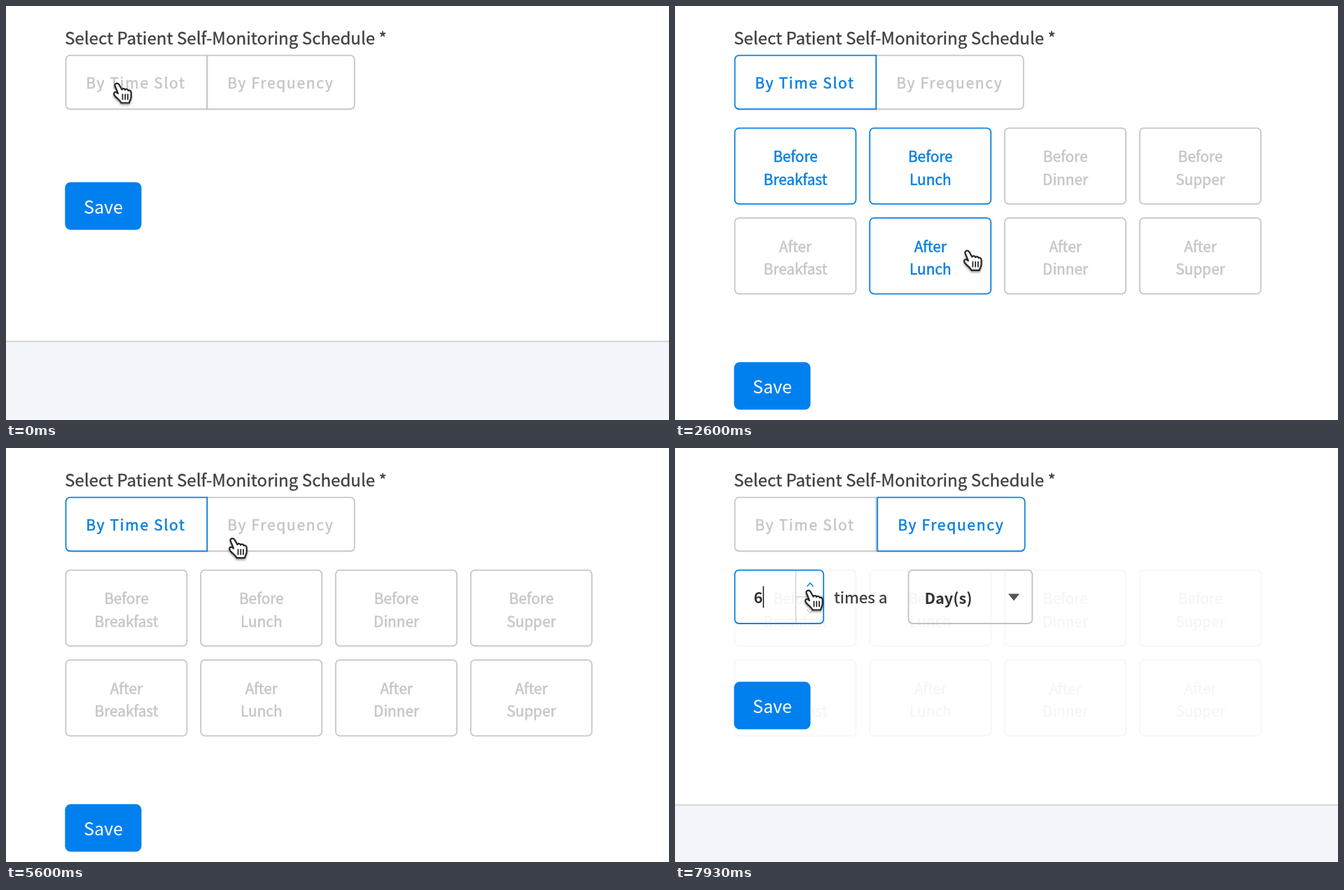
An HTML page for the animation above (8000 ms loop, 947 by 592 pixels).

```html
<!DOCTYPE html>
<html lang="en">
<head>
<meta charset="utf-8">
<title>Schedule picker</title>
<style>
html, body { margin: 0; width: 100%; height: 100%; overflow: hidden; background: #fff; }
svg { display: block; width: 947px; height: 592px; --blue: #0a80e2; }
text { font-family: "Noto Sans CJK JP", "Noto Sans CJK SC", "Noto Sans CJK", "Noto Sans", sans-serif; font-weight: 400; }
.title { font-size: 24.1px; fill: #404040; stroke: #404040; stroke-width: .35px; }
.tab, .tile { color: #c6c6c6; }
.tab.on, .tile.on { color: var(--blue); }
.tab text, .tile text { fill: currentColor; stroke: currentColor; stroke-width: .55px; }
.tab text { font-size: 21px; letter-spacing: 1.7px; }
.tile text { font-size: 20.8px; text-anchor: middle; }
.tab path, .tile rect { fill: none; stroke: currentColor; stroke-width: 1.8px; }
.save text { font-size: 25.2px; fill: #fff; text-anchor: middle; }
.field { fill: none; stroke: #c2c2c2; stroke-width: 1.8px; }
.thin { fill: none; stroke: #d2d2d2; stroke-width: 1.4px; }
.chevron { fill: none; stroke: #999; stroke-width: 1.5px; }
.bold { font-size: 21.7px; font-weight: 700; fill: #333; }
.unit { font-size: 22.5px; fill: #383838; stroke: #383838; stroke-width: .3px; }
.focus #box, .focus #up { stroke: var(--blue); }
.focus #up { transform: translateY(2px); }
#caret { stroke: #222; stroke-width: 1.6px; visibility: hidden; }
.focus #caret { visibility: visible; }
#cursor { filter: drop-shadow(0 2px 1.5px rgba(0,0,0,.4)); }
</style>
</head>
<body>
<svg viewBox="0 0 947 592">
  <g id="footer">
    <rect width="947" height="600" fill="#f2f6fb"/>
    <rect width="947" height="2" fill="#d3d5d8"/>
  </g>
  <text class="title" x="84" y="55">Select Patient Self-Monitoring Schedule *</text>
  <g id="tabs">
    <g class="tab" id="slot">
      <path d="M287.3 70.7H91.5a6 6 0 0 0-6 6V141.5a6 6 0 0 0 6 6H287.3Z"/>
      <text x="114.3" y="118">By Time Slot</text>
    </g>
    <g class="tab" id="freq">
      <path d="M287.3 70.7H491.8a6 6 0 0 1 6 6V141.5a6 6 0 0 1-6 6H287.3Z"/>
      <text x="316.3" y="118">By Frequency</text>
    </g>
  </g>
  <g id="tiles"></g>
  <g id="form">
    <path class="thin" d="M172.5 175V251M173 213H212"/>
    <rect class="field" id="box" x="85.4" y="174.6" width="126.8" height="76.4" rx="6"/>
    <path class="chevron" id="up" d="M188.5 196l4.5-5 4.5 5"/>
    <path class="chevron" opacity=".5" d="M188.5 231l4.5 5 4.5-5"/>
    <text class="bold" id="count" x="119" y="221.5" text-anchor="middle">1</text>
    <path id="caret" d="M126.3 197.5V228.5"/>
    <text class="unit" x="227.3" y="221.5">times a</text>
    <rect class="field" x="333.5" y="174.6" width="176.8" height="76.4" rx="6"/>
    <text class="bold" x="356.5" y="223">Day(s)</text>
    <path d="M476 208.5h16l-8 10z" fill="#555"/>
  </g>
  <g id="save" class="save">
    <rect x="84.3" width="109.2" height="68" rx="8" fill="#0080ee"/>
    <text x="139" y="44.5">Save</text>
  </g>
  <g id="cursor">
    <g id="hand" stroke="#262626" stroke-linejoin="round" stroke-linecap="round">
      <path stroke-width="2.2" fill="#fff" d="M-3 4C-5 0 0-2 2.500 1.500L6.500 8.500C7.500 6.500 10.500 6.500 11 9C12 7.500 15 7.500 15.800 10C17.500 9 19.500 10 19.700 13V19C19.700 22.500 17.500 24 17 27.500H5.500C5 25 0 21.500-3 18C-6.500 14.500-4.500 11-1 12.500L1 14Z"/>
      <path stroke-width="1.8" d="M7.500 15.500v7M11.300 15.500v7M15 15.500v7"/>
    </g>
    <path id="arrow" d="M0 0V23.500L5.300 18.700L9.200 27.500L13.200 25.700L9.500 17.200H16.500Z" fill="#141414" stroke="#fff" stroke-width="1.5"/>
  </g>
</svg>
<script>
const $ = id => document.getElementById(id);
const LOOP = 8000, FPS = 15, FADE = 600, GLIDE = 330, LAG = 70;
const GRID = { x: 85.4, y: 174.6, dx: 192.8, dy: 128.5, w: 173, h: 108.6 };

// pointer stops: arrival, x, y, travel time if slower than GLIDE
const START = [159, 111];
const stops = [
  [330, 195, 113], [1470, 134, 214], [1930, 338, 214], [2400, 362, 348],
  [2870, 531, 355], [3470, 548, 354], [4000, 351, 356], [4500, 368, 190],
  [5070, 198, 215], [5870, 356, 108, 600], [6930, 197, 204, 660], [7130, 191, 204]
];
// what a click does follows from where the pointer is
const clicks = [800, 1670, 2070, 2600, 3070, 3730, 4200, 4800, 5330, 6130, 7200, 7470, 7670, 7800, 7930];

const meals = ["Breakfast", "Lunch", "Dinner", "Supper"];
$("tiles").innerHTML = ["Before", "After"].map((when, row) => meals.map((meal, col) =>
  `<g class="tile" transform="translate(${GRID.x + col * GRID.dx} ${GRID.y + row * GRID.dy})">
    <rect width="${GRID.w}" height="${GRID.h}" rx="6"/>
    <text x="86.600" y="48.700">${when}</text><text x="86.600" y="81">${meal}</text>
  </g>`).join("")).join("");
const tiles = [...$("tiles").children];

const ramp = (t, start, length) => Math.min(1, Math.max(0, (t - start) / length));
const show = (el, on) => el.style.display = on ? "" : "none";
const put = (el, x, y) => el.setAttribute("transform", `translate(${x} ${y})`);

function pointer(t) {
  let [x, y] = START;
  for (const [end, toX, toY, length = GLIDE] of stops) {
    const k = 1 - (1 - ramp(t, end - length, length)) ** 2;
    x += (toX - x) * k;
    y += (toY - y) * k;
  }
  return [x, y];
}

// tab name, tile index, "up" for the spinner, or null
function hit([x, y], tab) {
  if (y > 70 && y < 148 && x > 85 && x < 498) return x < 288 ? "slot" : "freq";
  if (tab === "slot") {
    const col = (x - GRID.x) / GRID.dx, row = (y - GRID.y) / GRID.dy;
    const inside = col >= 0 && col < 4 && row >= 0 && row < 2
      && col % 1 * GRID.dx < GRID.w && row % 1 * GRID.dy < GRID.h;
    return inside ? Math.floor(row) * 4 + Math.floor(col) : null;
  }
  return tab === "freq" && x > 172 && x < 213 && y > 174 && y < 252 ? "up" : null;
}

function stateAt(t) {
  const state = { tab: null, since: 0, on: new Set(), count: 1 };
  for (const time of clicks) {
    if (time > t) break;
    const target = hit(pointer(time), state.tab);
    if (target === "up") state.count++;
    else if (typeof target === "string") Object.assign(state, { tab: target, since: time });
    else if (target !== null && !state.on.delete(target)) state.on.add(target);
  }
  return state;
}

const layout = {
  null: { save: 252, footer: 478.7 },
  slot: { save: 509.3, footer: 700 },
  freq: { save: 334.3, footer: 509.5 }
};

let shownTab;
function setTab(tab) {
  if (tab === shownTab) return;
  shownTab = tab;
  for (const id of ["slot", "freq"]) $(id).classList.toggle("on", id === tab);
  if (tab) $("tabs").append($(tab));
  put($("freq"), tab === "freq" ? 1.9 : 0, 0);
  put($("save"), 0, layout[tab].save);
  put($("footer"), 0, layout[tab].footer);
}

function draw(t) {
  const { tab, since, on, count } = stateAt(t);
  const fade = ramp(t, since - 60, FADE);
  setTab(tab);

  // the tiles leave a faint trace behind the form
  $("tiles").style.opacity = tab === "slot" ? fade : tab ? 1 - .84 * fade : 0;
  tiles.forEach((tile, i) => tile.classList.toggle("on", on.has(i)));

  $("form").style.opacity = tab === "freq" ? fade : 0;
  $("form").classList.toggle("focus", count > 1);
  $("count").textContent = count;

  // the pointer shape trails its position a little
  const over = hit(pointer(t - LAG), tab) !== null;
  show($("hand"), over);
  show($("arrow"), !over);
  put($("cursor"), ...pointer(t));
}

const begin = performance.now();
function tick() {
  const t = (performance.now() - begin) % LOOP;
  const step = Math.floor((t + 4) * FPS / 1000) % (LOOP * FPS / 1000);
  draw(Math.round(step * 100 / FPS) * 10);
  requestAnimationFrame(tick);
}
tick();
</script>
</body>
</html>
```
